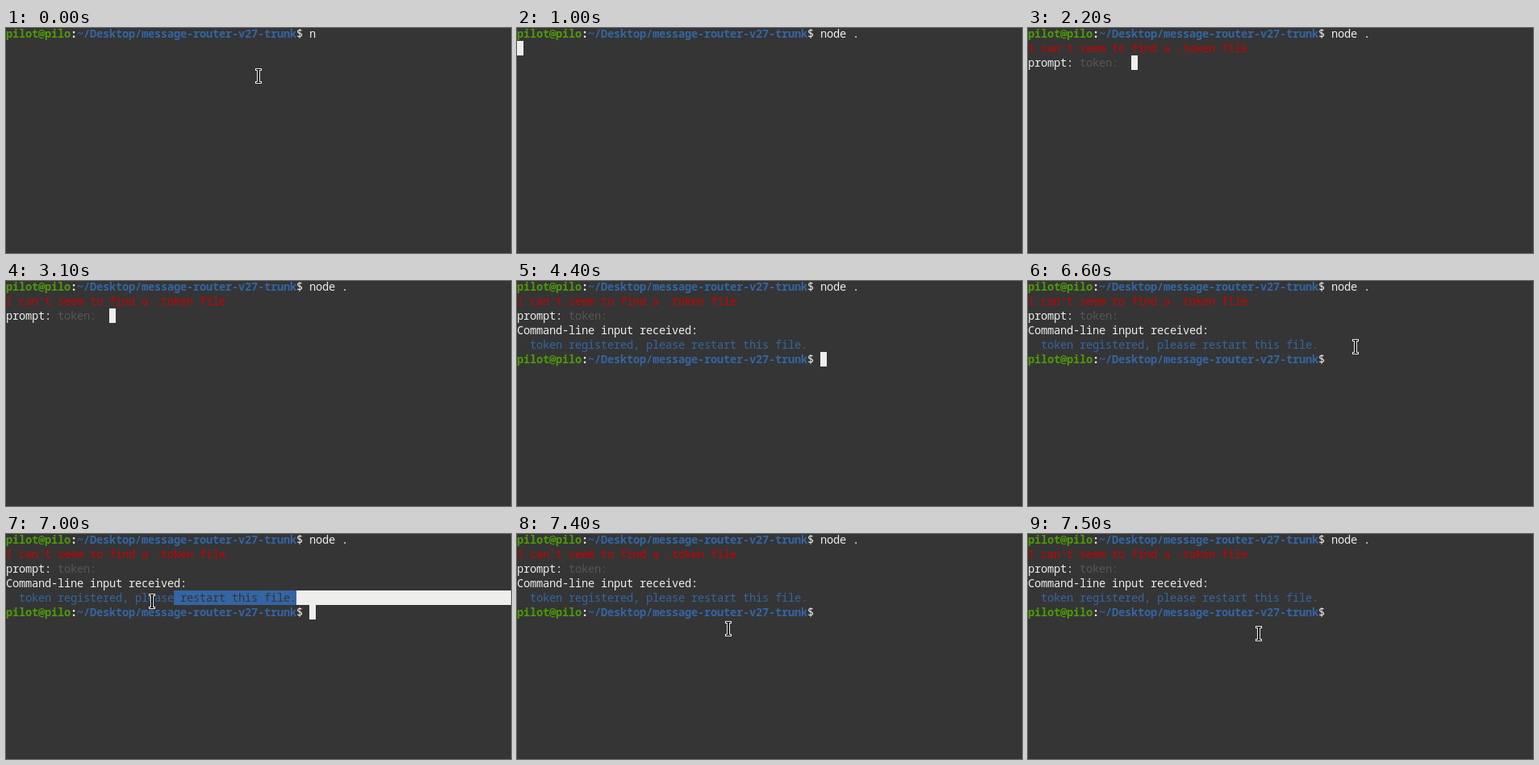
An HTML page with a canvas that plays this animation: 626x279 px, repeating every 8000 ms.

```html
<!DOCTYPE html>
<html lang="en">
<head>
<meta charset="utf-8">
<title>Terminal session</title>
<style>
  html, body { margin: 0; width: 100%; height: 100%; overflow: hidden; background: #353535; }
  canvas { display: block; }
</style>
</head>
<body>
<canvas id="stage" width="626" height="279"></canvas>
<script>
const ctx = document.getElementById('stage').getContext('2d');
const LOOP = 8000, STEP = 100, WIDTH = 626, HEIGHT = 279;
const CELL = 8, ROW = 18, TOP = -2, BASELINE = 14;
const FONT = '13.7px "Noto Sans Mono", "DejaVu Sans Mono", monospace';
const BG = '#353535', FG = '#eeeeec', GREEN = '#4e9a06', BLUE = '#3465a4',
      RED = '#cc0000', DIM = '#555753';
const USER = 'pilot@pilo', PATH = '~/Desktop/message-router-v27-trunk';
const COMMAND = 'node .';
const NOTICE = '  token registered, please restart this file.';
const INPUT_COL = USER.length + PATH.length + 3;

function rect(color, x, y, w, h) {
  ctx.fillStyle = color;
  ctx.fillRect(x, y, w, h);
}

function print(text, col, row, color, weight = 500) {
  ctx.font = `${weight} ${FONT}`;
  ctx.textAlign = 'center';
  ctx.fillStyle = color;
  [...text].forEach((char, i) =>
    ctx.fillText(char, (col + i + 0.5) * CELL, TOP + row * ROW + BASELINE));
}

function printPrompt(row) {
  const pathCol = USER.length + 1;
  print(USER, 0, row, GREEN, 700);
  print(':', USER.length, row, FG, 700);
  print(PATH, pathCol, row, BLUE, 700);
  print('$', pathCol + PATH.length, row, FG);
}

function drawCaret(col, row) {
  rect(FG, col * CELL, TOP + row * ROW, CELL, ROW);
}

// I-beam: the same three bars, white first and then inset in black
function drawPointer(left, top) {
  const x = Math.round(left), y = Math.round(top);
  [[FG, 0], ['#000', 1]].forEach(([color, inset]) => {
    const bar = (dx, dy, w, h) =>
      rect(color, x + dx + inset, y + dy + inset, w - 2 * inset, h - 2 * inset);
    bar(0, 0, 8, 3);
    bar(2, 0, 4, 19);
    bar(0, 16, 8, 3);
  });
}

// Sine ease in and out between two points
function glide(u, from, to) {
  const k = (1 - Math.cos(Math.PI * u)) / 2;
  return from.map((v, i) => v + (to[i] - v) * k);
}

function pointerAt(t) {
  const dragEnd = [116, 74];
  if (t < 200) return [309, 50];
  if (t < 6100) return null;
  if (t < 6800) {
    const u = Math.min(1, (t - 6100) / 500);
    return [364 + 63 * Math.sin(2.5 * u), 39 - 163 * u + 196 * u * u];
  }
  if (t < 7100) return glide((t - 6800) / 300, [360, 73], dragEnd);
  return glide(Math.min(1, (t - 7100) / 400), dragEnd, [282, 114]);
}

// The selection edge trails the pointer slightly
function drawSelection(t) {
  const col = Math.round(pointerAt(t - 28)[0] / CELL);
  const y = TOP + 4 * ROW, x = col * CELL, end = NOTICE.length * CELL;
  if (x < end) rect(BLUE, x, y, end - x, ROW);
  rect(FG, Math.max(x, end), y, WIDTH, ROW);
  print(NOTICE.slice(col), col, 4, BG);
}

// Blink phase restarts at every key press or new output
const blinkOn = (t, start) => Math.floor((t - start) / 600) % 2 === 0;

function typedLength(t) {
  if (t >= 700) return COMMAND.length;
  return Math.max(1, Math.min(5, t / STEP));
}

function caretAt(t) {
  if (t < 200) return null;
  if (t < 1000) return [INPUT_COL + typedLength(t), 0];
  if (t < 1500) return [0, 1];
  if (t < 3100) return blinkOn(t, 1000) ? [16, 2] : null;
  if (t < 4400) return [16, 2];
  return blinkOn(t, 4400) ? [INPUT_COL, 5] : null;
}

function draw(t) {
  rect(BG, 0, 0, WIDTH, HEIGHT);
  printPrompt(0);
  print(COMMAND.slice(0, typedLength(t)), INPUT_COL, 0, FG);

  if (t >= 1500) {
    print("I can't seem to find a .token file", 0, 1, RED);
    print('prompt:', 0, 2, FG);
    print('token:', 8, 2, DIM);
  }
  if (t >= 4400) {
    print('Command-line input received:', 0, 3, FG);
    print(NOTICE, 0, 4, BLUE);
    printPrompt(5);
  }
  if (t >= 6800 && t < 7300) drawSelection(t);

  const caret = caretAt(t);
  if (caret) drawCaret(...caret);

  const pointer = pointerAt(t);
  if (pointer) drawPointer(...pointer);
}

function frame() {
  const t = performance.now() % LOOP;
  draw(Math.floor(t / STEP) * STEP);
  requestAnimationFrame(frame);
}
frame();
</script>
</body>
</html>
```
